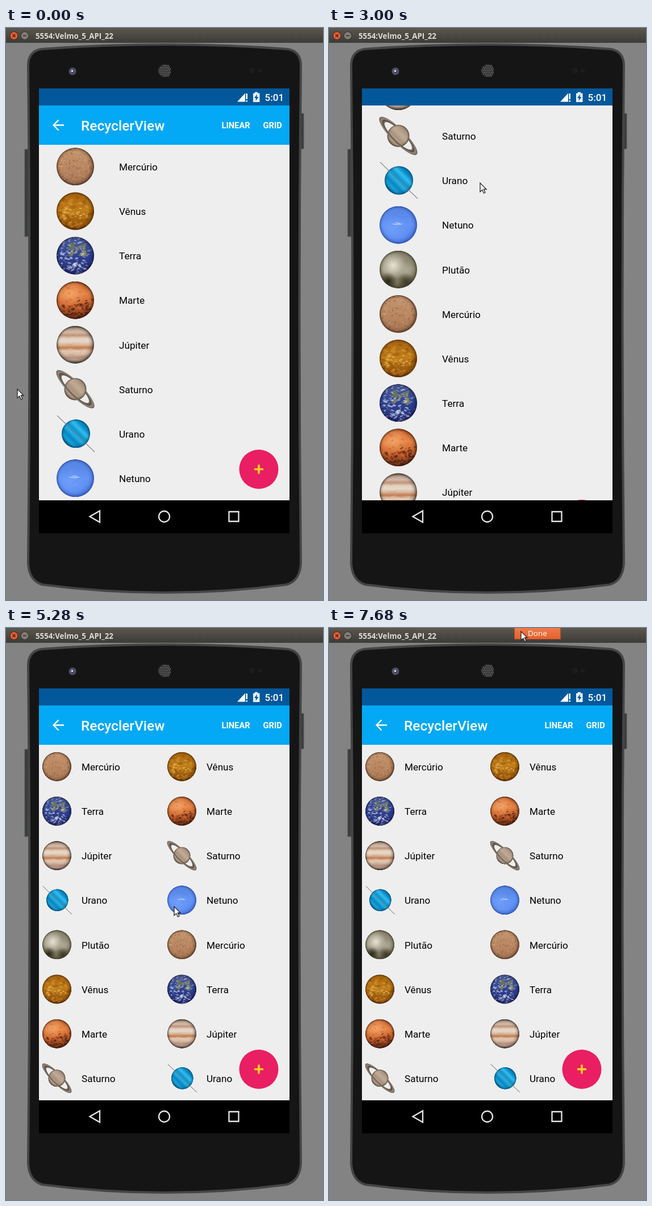
Write an HTML page with a canvas that moves like this. It is 558 px wide and 1004 px high and loops after 7.8 s.

```html
<!DOCTYPE html>
<html lang="pt">
<head>
<meta charset="utf-8">
<style>
html, body { margin: 0; width: 100%; height: 100%; overflow: hidden; background: #838383; }
canvas { display: block; }
</style>
</head>
<body>
<canvas id="stage" width="558" height="1004"></canvas>
<script>
const ctx = document.getElementById('stage').getContext('2d');
const LOOP = 7800, STEP = 120, ROW = 78.14, GRID_FROM = 4680, DONE_FROM = 7320;
const SCREEN = [58, 136, 441, 693];
const NAMES = ['Mercúrio', 'Vênus', 'Terra', 'Marte', 'Júpiter', 'Saturno', 'Urano', 'Netuno', 'Plutão'];

const linear = p => p;
const easeOut = p => 1 - (1 - p) ** 2;
const smooth = p => p * p * (3 - 2 * p);

// Runs a chain of moves, each going from wherever the value is to its own goal.
function follow(start, moves, t, ease) {
  return moves.reduce((value, { at, lasts, to }) => {
    const p = ease(Math.min(1, Math.max(0, (t - at) / lasts)));
    return value.map((v, i) => v + (to[i] - v) * p);
  }, start);
}

// Start, duration and the row that the list reaches.
const FLINGS = [[720, 1080, 8.1], [2160, 840, 14.69], [3480, 240, 13], [3720, 480, 0],
  [5400, 600, 7], [6360, 240, 2.14], [6600, 120, 0]]
  .map(([at, lasts, row]) => ({ at, lasts, to: [row * ROW] }));

// The bars alternately hide and return.
const TOGGLES = [860, 3516, 5400, 6480].map((at, i) => ({ at, lasts: 300, to: [i % 2] }));

// Start of each pointer move and the place it leads to.
const POINTER = [[240, 300, 680], [840, 277, 353], [1800, 290, 580], [2280, 265, 271], [3240, 310, 589],
  [4080, 468, 170], [4680, 295, 488], [5400, 285, 300], [6000, 250, 578], [6600, 380, -30], [7200, 337, 5]]
  .map(([at, ...to]) => ({ at, lasts: 480, to }));

function seeded(seed) {
  return () => (seed = (seed * 16807) % 2147483647) / 2147483647;
}

function disc(c, x, y, r, fill) {
  c.fillStyle = fill;
  c.beginPath();
  c.arc(x, y, r, 0, 7);
  c.fill();
}

function shape(c, d, fill, stroke, width = 2) {
  const path = new Path2D(d);
  if (fill) { c.fillStyle = fill; c.fill(path); }
  if (stroke) { c.strokeStyle = stroke; c.lineWidth = width; c.stroke(path); }
}

function text(c, s, x, y, font, fill) {
  c.font = font;
  c.fillStyle = fill;
  c.fillText(s, x, y);
}

function addStops(gradient, colors) {
  colors.forEach((color, i) => gradient.addColorStop(i / (colors.length - 1), color));
  return gradient;
}

function verticalFill(c, top, bottom, colors) {
  return addStops(c.createLinearGradient(0, top, 0, bottom), colors);
}

// A soft spot that fades out; rgb is a "r,g,b" string.
function glow(c, x, y, r, rgb, alpha = 1) {
  disc(c, x, y, r, addStops(c.createRadialGradient(x, y, 0, x, y, r), [`rgba(${rgb},${alpha})`, `rgba(${rgb},0)`]));
}

// Planet sprites use a centred space in which a full disc has radius 33.
function sprite(paint) {
  const canvas = document.createElement('canvas');
  canvas.width = canvas.height = 140;
  const c = canvas.getContext('2d');
  c.translate(70, 70);
  c.scale(2, 2);
  paint(c);
  return canvas;
}

function globe(c, r, colors, detail, rim) {
  c.save();
  c.beginPath();
  c.arc(0, 0, r, 0, 7);
  c.clip();
  c.fillStyle = verticalFill(c, -r, r, colors);
  c.fillRect(-r, -r, 2 * r, 2 * r);
  detail(c);
  const shade = c.createRadialGradient(-r * .06, -r * .06, r * .75, 0, 0, r);
  disc(c, 0, 0, r, addStops(shade, [`rgba(${rim},0)`, `rgba(${rim},.15)`, `rgba(${rim},.7)`]));
  c.restore();
}

// Scatters soft ellipses around (x, y) within the given spread.
function blobs(c, count, colors, size, { stretch = 1, x = 0, y = 0, w = 33, h = 33, alpha = .45 } = {}) {
  const rnd = seeded(count * 97 + 5);
  c.globalAlpha = alpha;
  for (let i = 0; i < count; i++) {
    const r = size * (.3 + rnd());
    c.fillStyle = colors[i % colors.length];
    c.beginPath();
    c.ellipse(x + (rnd() * 2 - 1) * w, y + (rnd() * 2 - 1) * h, r * stretch, r, (rnd() - .5) * 1.4, 0, 7);
    c.fill();
  }
  c.globalAlpha = 1;
}

function mercury(c) {
  globe(c, 33, ['#c4956f', '#ba8862', '#a87753'], c => {
    blobs(c, 280, ['#d9ab86', '#946649', '#c69470', '#805a43'], 1.3);
    blobs(c, 30, ['#edc9a9'], .8);
  }, '45,25,15');
}

function venus(c) {
  globe(c, 33, ['#a8640f', '#c07d1a', '#854407'], c => {
    blobs(c, 120, ['#cf8a22', '#8a4a08', '#dda03a', '#a3610e'], 2.4, { stretch: 1.8 });
    blobs(c, 40, ['#f3cd68'], 1, { stretch: 2.6, x: 2, y: 2, w: 24, h: 11, alpha: .6 });
  }, '60,28,0');
}

function earth(c) {
  globe(c, 33, ['#4c5c96', '#2f4190', '#26307a'], c => {
    blobs(c, 30, ['#7d8059', '#9b9269', '#5d7150'], 3.6, { x: 3, y: -10, w: 13, h: 10, alpha: .7 });
    blobs(c, 130, ['#fff', '#d2dbea', '#8b9fce'], 1.2, { stretch: 2.6, alpha: .5 });
    blobs(c, 24, ['#fff'], 1.3, { stretch: 2, x: -6, y: 13, w: 20, h: 10, alpha: .5 });
  }, '12,15,55');
}

function mars(c) {
  globe(c, 33, ['#c8642f', '#e58344', '#c85f2a', '#71301a'], c => {
    glow(c, -8, -12, 26, '246,172,112', .8);
    blobs(c, 90, ['#ee9b5d', '#b85422', '#dc8246'], 1.8, { stretch: 1.6, alpha: .35 });
    blobs(c, 60, ['#35180f', '#5b2713'], 1.7, { stretch: 1.7, x: 2, y: 19, w: 27, h: 12, alpha: .55 });
    blobs(c, 9, ['#4b2013'], 1.3, { stretch: 2.5, x: 14, y: 3, w: 16, h: 5, alpha: .6 });
  }, '35,12,5');
}

function jupiter(c) {
  const bands = ['#75665e', '#b9a08f', '#d3bcaa', '#c0957a', '#e4d2c1', '#e8d8c9', '#d9b99f',
    '#c27a50', '#e2c6ae', '#d8bda8', '#b99582', '#bfa593', '#77655b'];
  globe(c, 33, bands, c => blobs(c, 70, ['#f0e3d5', '#b67f5d', '#dcbca4'], .6, { stretch: 9, alpha: .3 }), '25,18,15');
}

function saturn(c) {
  const halfRing = (scale, thickness, color, from) => {
    c.fillStyle = color;
    c.beginPath();
    c.ellipse(0, 0, 46 * scale, 12 * scale, 0, from, from + Math.PI);
    c.ellipse(0, 0, 46 * scale * thickness, 12 * scale * thickness, 0, from + Math.PI, from, true);
    c.fill();
  };
  const ring = from => {
    halfRing(1, .72, '#6f645a', from);
    halfRing(.95, .9, '#8f8376', from);
    halfRing(.83, .96, '#453e38', from);
  };
  c.rotate(Math.PI / 4);
  ring(Math.PI);
  globe(c, 19.5, ['#8d7d70', '#b39d89', '#c2ab95', '#a8917e', '#c0a890', '#8b7868'], () => {}, '40,30,22');
  ring(0);
}

function uranus(c) {
  c.save();
  c.translate(1, 0);
  c.rotate(Math.PI / 4);
  globe(c, 25, ['#0873ad', '#0a8dc6', '#35bdf0', '#0d95cd', '#25b0e6', '#0a86bf', '#18a5db', '#076a9f'], () => {}, '0,55,95');
  c.restore();
  shape(c, 'M-32 -32L34 32', null, '#77787a', 1.1);
}

function neptune(c) {
  globe(c, 33, ['#5482e0', '#6494f5', '#5788ee'], c => {
    glow(c, -8, 8, 26, '122,168,255', .6);
    blobs(c, 14, ['#4a7be0', '#86b0fa'], 1, { stretch: 10, alpha: .2 });
    shape(c, 'M-10 -2Q-2 0 7 -2M-5 -4L3 -3', null, '#dbe8ff', 1.1);
  }, '30,60,150');
}

function pluto(c) {
  globe(c, 33, ['#858069', '#9b967f', '#6a654e'], c => {
    glow(c, -9, -7, 24, '230,227,212');
    glow(c, 14, 2, 16, '178,173,152', .8);
    glow(c, -18, 21, 16, '42,38,22');
    glow(c, 14, 22, 16, '55,50,32', .9);
  }, '50,46,30');
}

const PLANETS = [mercury, venus, earth, mars, jupiter, saturn, uranus, neptune, pluto].map(sprite);

function drawWindow() {
  ctx.fillStyle = '#838383';
  ctx.fillRect(0, 0, 558, 1004);
  ctx.fillStyle = verticalFill(ctx, 0, 26, ['#5b584f', '#3d3b37']);
  ctx.fillRect(0, 0, 558, 26);
  [[14, '#ea5b31'], [33, '#807d73']].forEach(([x, color]) => {
    disc(ctx, x, 13.5, 7.5, '#33312d');
    disc(ctx, x, 13.5, 6.5, color);
  });
  shape(ctx, 'M11.5 11L16.5 16M16.5 11L11.5 16M30 13.5H36', null, '#3a2a20', 1.5);
  text(ctx, '5554:Velmo_5_API_22', 52, 18.5, 'bold 13.3px "Open Sans", sans-serif', '#dfdbd2');
}

function drawPhone() {
  shape(ctx, 'M33 213H39V366H33ZM519 150H524V212H519Z', '#3b3c3d', '#555', 1);
  shape(ctx, 'M39 66Q39 41 62 37Q170 29 279 29Q388 29 496 37Q519 41 519 66Q514 505 519 938' +
    'Q518 970 494 977Q388 991 279 991Q170 991 64 977Q40 970 39 938Q44 505 39 66Z', '#151515', '#434546', 4);
  disc(ctx, 117, 76, 7, '#3a3a42');
  disc(ctx, 117, 76, 5, '#6c6e88');
  disc(ctx, 117, 76, 3.4, '#2b2c50');
  disc(ctx, 116.5, 75.5, 2, '#d4d6f0');
  disc(ctx, 279, 75, 11.5, '#292929');
  for (let y = -9; y <= 9; y += 3)
    for (let x = -10; x <= 10; x += 3)
      if (x * x + y * y < 110) disc(ctx, 279.5 + x + (y % 2 ? 1.5 : 0), 75 + y, 1, '#777');
  disc(ctx, 433, 75, 5, '#201b1b');
  disc(ctx, 447, 75, 3.5, '#201b1b');

  ctx.fillStyle = '#03589b';
  ctx.fillRect(58, 106, 441, 30);
  shape(ctx, 'M407 129.5L421 114.5V129.5ZM422.5 115H425V125H422.5ZM422.5 127H425V129.5H422.5Z', '#fff');
  shape(ctx, 'M435 114.5H438V112.5H443V114.5H446.5V130H435Z', '#e9f1f7');
  shape(ctx, 'M442 116L437 123H440L439.5 128L444.5 121H441.5Z', '#03589b');
  text(ctx, '5:01', 455.5, 128, '500 17.15px Roboto, sans-serif', '#fff');

  ctx.fillStyle = '#000';
  ctx.fillRect(58, 828, 441, 59);
  shape(ctx, 'M147.5 857.5L165 847.5V867.5ZM392.5 849H409.5V866H392.5Z', null, '#e6e6e6', 2.3);
  shape(ctx, 'M269 857.5A9.5 9.5 0 1 0 288 857.5A9.5 9.5 0 1 0 269 857.5Z', null, '#e6e6e6', 2.3);
}

function drawItem(index, x, labelX, y, scale) {
  const size = 70 * scale;
  ctx.drawImage(PLANETS[index % 9], x - size / 2, y - size / 2, size, size);
  text(ctx, NAMES[index % 9], labelX, Math.round(y + 6.7), '17.15px Roboto, sans-serif', '#000');
}

function drawList(scroll, grid) {
  const first = Math.max(0, Math.floor((scroll - 150) / ROW));
  for (let row = first; row < first + 12; row++) {
    const y = 243.3 + row * ROW - scroll;
    if (grid) {
      drawItem(row * 2, 89.5, 133, y, .773);
      drawItem(row * 2 + 1, 309.5, 353, y, .773);
    } else {
      drawItem(row, 122, 199, y, 1);
    }
  }
}

// Composed on its own layer so that the whole bar fades as one.
const toolbar = document.createElement('canvas');
toolbar.width = 441;
toolbar.height = 69;

function paintToolbar() {
  const c = toolbar.getContext('2d');
  c.fillStyle = '#03a9f4';
  c.fillRect(0, 0, 441, 69);
  c.translate(-58, -136);
  shape(c, 'M102 170.5H84M92.5 161.5L83.5 170.5L92.5 179.5', null, '#fff', 2.3);
  text(c, 'RecyclerView', 132, 180, '500 24.5px Roboto, sans-serif', '#fff');
  const action = 'bold 14.7px Roboto, sans-serif';
  text(c, 'LINEAR', 379.5, 176.3, action, '#fff');
  text(c, 'GRID', 452.5, 176.3, action, '#fff');
}

function drawBars(shown) {
  const hidden = 1 - easeOut(shown);
  ctx.globalAlpha = shown;
  ctx.drawImage(toolbar, 58, Math.round(136 - 69 * hidden));
  ctx.globalAlpha = 1;
  const y = 774.5 + Math.round(88 * hidden);
  disc(ctx, 445, y, 34.5, '#e91e63');
  shape(ctx, `M437 ${y}H453M445 ${y - 8}V${y + 8}`, null, '#fdd01e', 3.6);
}

function drawDone() {
  ctx.fillStyle = verticalFill(ctx, 0, 20, ['#f07a49', '#e2602d']);
  ctx.fillRect(326, 0, 82, 19.5);
  shape(ctx, 'M326.5 0V19.5H407.5V0', null, '#b64f27', 1);
  text(ctx, 'Done', 350, 14, '13.5px "Open Sans", sans-serif', '#fff');
}

function drawPointer([x, y]) {
  ctx.save();
  ctx.translate(x, y);
  shape(ctx, 'M1 1V16.5L4.8 13L7.5 19L10 17.8L7.4 12H12Z', '#fff', '#222', 1.3);
  ctx.restore();
}

function draw(t) {
  drawWindow();
  drawPhone();
  ctx.save();
  ctx.beginPath();
  ctx.rect(...SCREEN);
  ctx.clip();
  ctx.fillStyle = '#eee';
  ctx.fillRect(...SCREEN);
  drawList(follow([0], FLINGS, t, easeOut)[0], t >= GRID_FROM);
  drawBars(follow([1], TOGGLES, t, linear)[0]);
  ctx.restore();
  if (t >= DONE_FROM) drawDone();
  drawPointer(follow([19, 633], POINTER, t, smooth));
}

const start = performance.now();
function tick() {
  const t = (performance.now() - start) % LOOP;
  draw(Math.floor(t / STEP) * STEP);
  requestAnimationFrame(tick);
}
paintToolbar();
tick();
</script>
</body>
</html>
```
